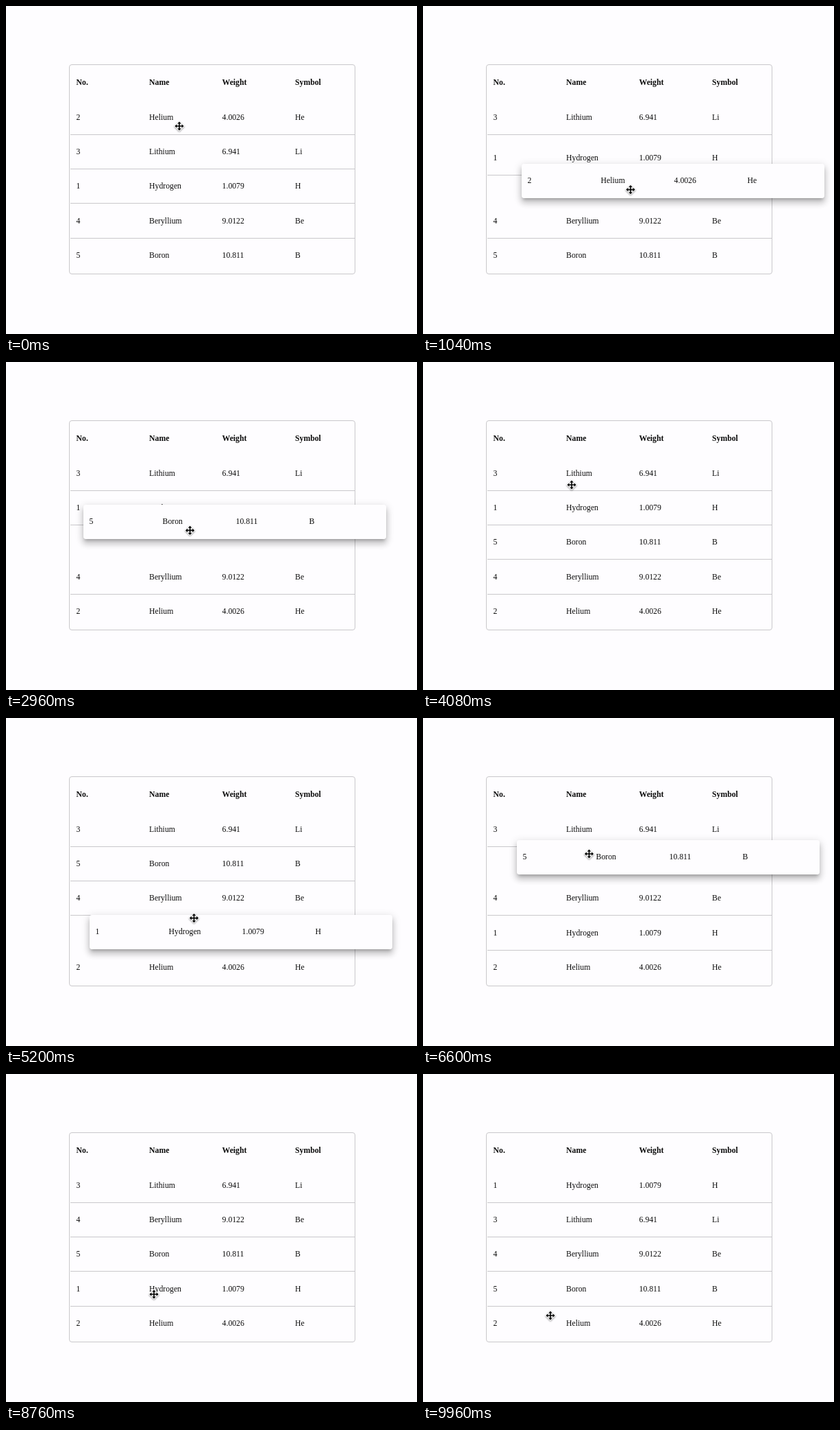
An HTML page that plays this animation: 600x478 px, repeating every 10 s.

```html
<!DOCTYPE html>
<html lang="en">
<head>
<meta charset="utf-8">
<title>Sortable table</title>
<style>
  html, body { margin: 0; width: 100%; height: 100%; overflow: hidden; background: #fefdff; }
  #stage {
    position: absolute; left: 0; top: 0; width: 600px; height: 478px; overflow: hidden;
    font: 11.73px/50px "Liberation Serif", "Times New Roman", serif; color: #0c0c0c;
  }
  #frame {
    position: absolute; left: 92px; top: 85px; width: 418px; height: 306px;
    box-sizing: border-box; border: 1px solid #c9c8cb; border-radius: 4px;
  }
  .row { position: absolute; left: 0; top: 0; width: 416px; height: 50px; }
  .row span { position: absolute; top: 0; white-space: nowrap; }
  .row.line::after {
    content: ""; position: absolute; left: 0; right: 0; bottom: 0;
    height: 1px; background: #c9c8cb;
  }
  .head { font-weight: bold; }
  .preview {
    width: 442px; background: #fefdff; border-radius: 3.4px;
    box-shadow: 0 4px 4px -2px rgba(0,0,0,.2),
                0 7px 8px 1px rgba(0,0,0,.14),
                0 3px 12px 2px rgba(0,0,0,.12);
  }
  #cursor { position: absolute; left: -10px; top: -10px; filter: drop-shadow(0 1px 1px rgba(0,0,0,.4)); }
</style>
</head>
<body>
<div id="stage">
  <div id="frame"></div>
  <svg id="cursor" width="20" height="20" viewBox="-10 -10 20 20">
    <defs><path id="arm" d="M-.8 0V-3.6H-2.8L0-6.6 2.8-3.6H.8V0Z"/></defs>
    <g id="halo" stroke="#fff" stroke-width="1.8" stroke-linejoin="round"></g>
    <g id="arrows"></g>
  </svg>
</div>
<script>
const LOOP = 10000, STEP = 40, SLIDE = 250;
const LEFT = 94, TOP = 137.9, ROW = 50.25;

const elements = {
  1: ["1", "Hydrogen", "1.0079", "H"],
  2: ["2", "Helium", "4.0026", "He"],
  3: ["3", "Lithium", "6.941", "Li"],
  4: ["4", "Beryllium", "9.0122", "Be"],
  5: ["5", "Boron", "10.811", "B"]
};
const ids = Object.keys(elements).map(Number);

// Pointer stops: time, x, y and, where it rests, the time it leaves
const stops = [
  [0, 253, 175, 490], [800, 275, 215], [1150, 309, 290], [1560, 304, 346, 1790],
  [2160, 293, 351], [2480, 250, 326], [2760, 318, 280], [2860, 300, 243],
  [3000, 263, 246, 3190], [4080, 217, 179], [4200, 219, 197], [4500, 262, 290],
  [4800, 275, 292, 5150], [6160, 198.5, 209], [6280, 242.5, 198, 6600],
  [6900, 254, 168], [7500, 247, 311], [7630, 245, 288.6], [7680, 243.5, 274],
  [7920, 243, 266, 8070], [8760, 216, 321, 8870], [9080, 241, 222],
  [9320, 208, 172, 9390], [9960, 186, 352]
];
const path = stops.flatMap(([t, x, y, leave]) =>
  leave ? [[t, x, y], [leave, x, y]] : [[t, x, y]]);

const drags = [
  { id: 2, grab: 500, drop: 1790 },
  { id: 5, grab: 2480, drop: 3190 },
  { id: 1, grab: 4190, drop: 5150 },
  { id: 5, grab: 6170, drop: 8070 },
  { id: 1, grab: 8870, drop: 9390 }
];

// Monotone cubic interpolation along the path
function slope(i, k) {
  if (i <= 0 || i >= path.length - 1) return 0;
  const [a, b, c] = [path[i - 1], path[i], path[i + 1]];
  const p = (b[k] - a[k]) / (b[0] - a[0]), q = (c[k] - b[k]) / (c[0] - b[0]);
  return p * q > 0 ? 2 * p * q / (p + q) : 0;
}

function pointer(t) {
  const i = path.findIndex(p => p[0] > t) - 1;
  if (i < 0) return path[path.length - 1].slice(1);
  const a = path[i], b = path[i + 1], h = b[0] - a[0], s = (t - a[0]) / h;
  return [1, 2].map(k =>
    a[k] + (b[k] - a[k]) * s * s * (3 - 2 * s) +
    h * s * (1 - s) * (slope(i, k) * (1 - s) - slope(i + 1, k) * s));
}

// cubic-bezier(0, 0, .2, 1)
function ease(x) {
  if (x <= 0) return 0;
  if (x >= 1) return 1;
  let lo = 0, hi = 1;
  for (let n = 0; n < 24; n++) {
    const s = (lo + hi) / 2;
    if (.6 * (1 - s) * s * s + s ** 3 < x) lo = s; else hi = s;
  }
  return 3 * (1 - lo) * lo * lo + lo ** 3;
}

const mix = (a, b, k) => a + (b - a) * k;
const slot = i => TOP + ROW * i;
const moves = {};

function rowY(id, t) {
  const m = moves[id].filter(m => m.t <= t).pop();
  return mix(m.from, m.to, ease((t - m.t) / SLIDE));
}

// Work out every swap of the loop once
let order = [2, 3, 1, 4, 5];
order.forEach((id, i) => moves[id] = [{ t: 0, from: slot(i), to: slot(i) }]);
const lastRow = [{ t: 0, id: order[4] }];

for (const d of drags) {
  const [x, y] = pointer(d.grab);
  d.dx = x - LEFT;
  d.dy = y - slot(order.indexOf(d.id));
  for (let t = d.grab; t <= d.drop; t += 2) {
    const over = Math.max(0, Math.min(4, Math.floor((pointer(t)[1] - TOP) / ROW)));
    if (over === order.indexOf(d.id)) continue;
    const next = order.filter(id => id !== d.id);
    next.splice(over, 0, d.id);
    next.forEach((id, i) => {
      if (order[i] !== id) moves[id].push({ t, from: rowY(id, t), to: slot(i) });
    });
    order = next;
  }
  d.end = slot(order.indexOf(d.id));
  lastRow.push({ t: d.drop + SLIDE, id: order[4] });
}

const stage = document.getElementById("stage");
const cursor = document.getElementById("cursor");

for (const id of ["halo", "arrows"]) {
  for (let n = 0; n < 4; n++) {
    const arm = document.createElementNS(cursor.namespaceURI, "use");
    arm.setAttribute("href", "#arm");
    arm.setAttribute("transform", `rotate(${n * 90})`);
    document.getElementById(id).append(arm);
  }
}

function addRow(cells, cls, gap) {
  const row = document.createElement("div");
  row.className = "row " + cls;
  cells.forEach((text, i) => {
    const cell = document.createElement("span");
    cell.textContent = text;
    cell.style.left = 8.6 + gap * i + "px";
    row.append(cell);
  });
  stage.insertBefore(row, cursor);
  return row;
}

const place = (el, x, y) => el.style.transform = `translate(${x}px, ${y}px)`;
const show = (el, on) => el.style.visibility = on ? "visible" : "hidden";

place(addRow(["No.", "Name", "Weight", "Symbol"], "head", 106.5), LEFT, 87);
const rows = {}, previews = {};
ids.forEach(id => rows[id] = addRow(elements[id], "line", 106.5));
ids.forEach(id => previews[id] = addRow(elements[id], "preview", 107));

function draw(t) {
  const [x, y] = pointer(t);
  const drag = drags.find(d => t >= d.grab && t < d.drop + SLIDE);
  const last = lastRow.filter(l => l.t <= t).pop().id;

  for (const id of ids) {
    const held = !!drag && drag.id === id;
    show(rows[id], !held);
    show(previews[id], held);
    rows[id].classList.toggle("line", id !== last);
    place(rows[id], LEFT, Math.round(rowY(id, t)));
  }
  if (drag) {
    const [px, py] = pointer(Math.min(t, drag.drop));
    const k = ease((t - drag.drop) / SLIDE);
    place(previews[drag.id],
      Math.round(mix(px - drag.dx, LEFT, k)),
      Math.round(mix(py - drag.dy, drag.end, k)));
  }
  place(cursor, x, y);
}

const start = performance.now();
function tick() {
  const t = (performance.now() - start) % LOOP;
  draw(Math.floor(t / STEP) * STEP);
  requestAnimationFrame(tick);
}
tick();
</script>
</body>
</html>
```
